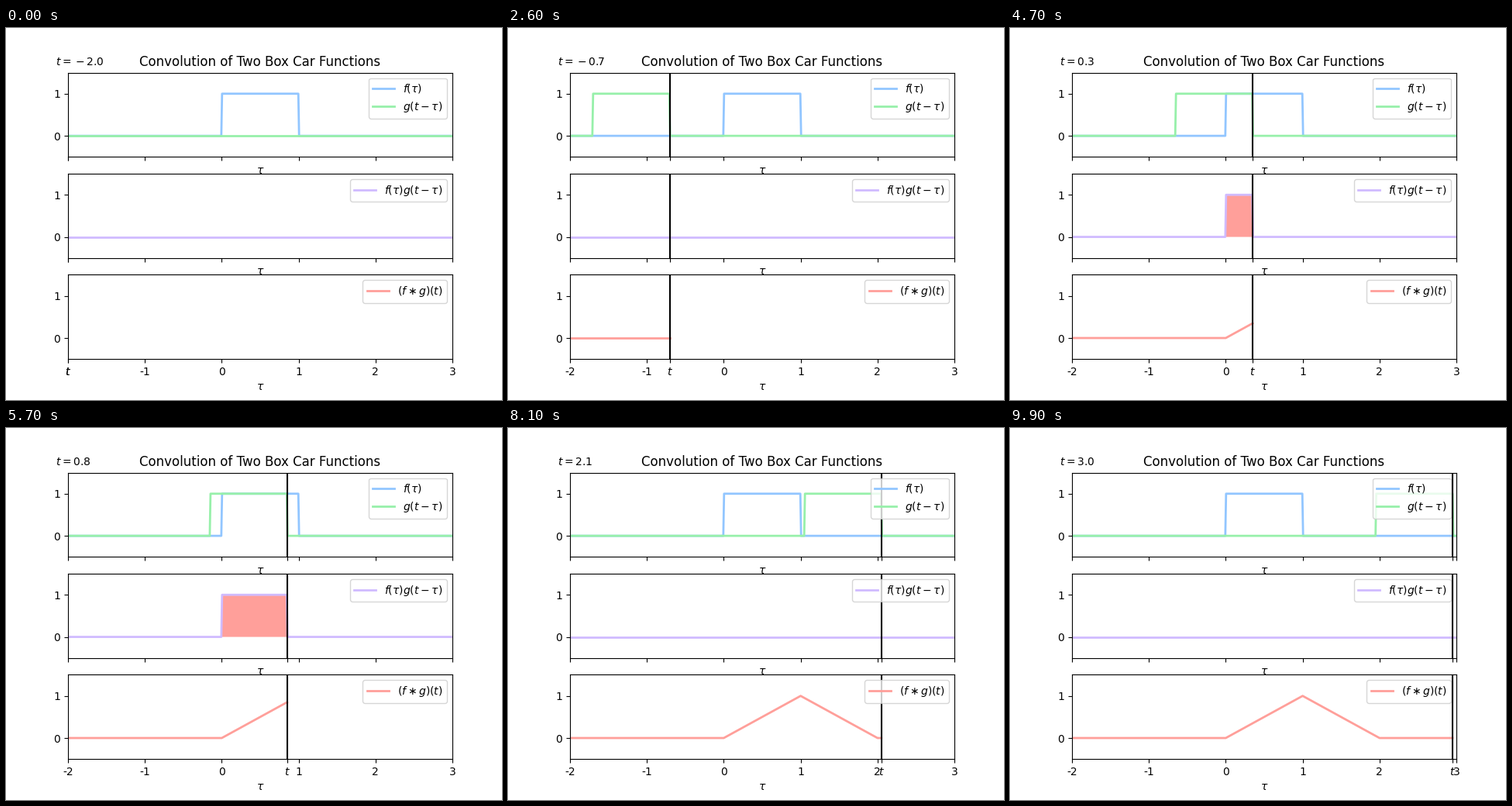
Animation of 640x480 px, one loop 10 s. Source, as a matplotlib script:

```python
import numpy as np
import matplotlib.pyplot as plt
from matplotlib.animation import FuncAnimation

FRAMES = 100
INTERVAL = 100
START, STOP = -2, 3
BLUE, GREEN, RED, PURPLE = "#92C6FF", "#97F0AA", "#FF9F9A", "#D0BBFF"

plt.rcParams["font.family"] = "DejaVu Sans"

tau = np.linspace(START, STOP, 500)
times = START + (STOP - START) * (np.arange(FRAMES) / FRAMES)


def box(x):
    return ((x > 0) & (x < 1)).astype(float)


def overlap(t):
    """Convolution of two unit boxes: a tent on [0, 2]."""
    return np.clip(1 - np.abs(t - 1), 0, None)


fig, axes = plt.subplots(3, 1, sharex=True, figsize=(6.4, 4.8), dpi=100)
top, mid, low = axes


def curve(ax, color, label):
    return ax.plot([], [], color=color, lw=2, label=label)[0]


f_line = curve(top, BLUE, r"$f(\tau)$")
g_line = curve(top, GREEN, r"$g(t-\tau)$")
product_line = curve(mid, PURPLE, r"$f(\tau)g(t-\tau)$")
conv_line = curve(low, RED, r"$(f \ast g)(t)$")
area = mid.fill([0, 0, 0], [0, 0, 0], color=RED, lw=0, zorder=1)[0]
cursors = [ax.axvline(START, color="black", lw=1.5) for ax in axes]

f = box(tau)
f_line.set_data(tau, f)

for ax in axes:
    ax.set_xlim(START, STOP)
    ax.set_ylim(-0.5, 1.5)
    ax.set_yticks([0, 1])
    ax.set_xlabel(r"$\tau$")
    ax.legend(loc="upper right")
top.set_title("Convolution of Two Box Car Functions")
clock = fig.text(0.1, 0.9, "")

marks = list(range(START, STOP + 1))
names = [str(m) for m in marks]


def update(i):
    t = times[i]
    g = box(t - tau)
    product = f * g
    g_line.set_data(tau, g)
    product_line.set_data(tau, product)
    area.set_xy(np.column_stack([tau, product]))
    past = times[:i + 1]
    conv_line.set_data(past, overlap(past))
    for cursor in cursors:
        cursor.set_xdata([t, t])
    low.set_xticks(marks + [t], names + ["$t$"])
    clock.set_text(f"$t = {t:.1f}$")


anim = FuncAnimation(fig, update, frames=FRAMES, interval=INTERVAL,
                     init_func=lambda: update(0), repeat=True, repeat_delay=0)
plt.show()
```
